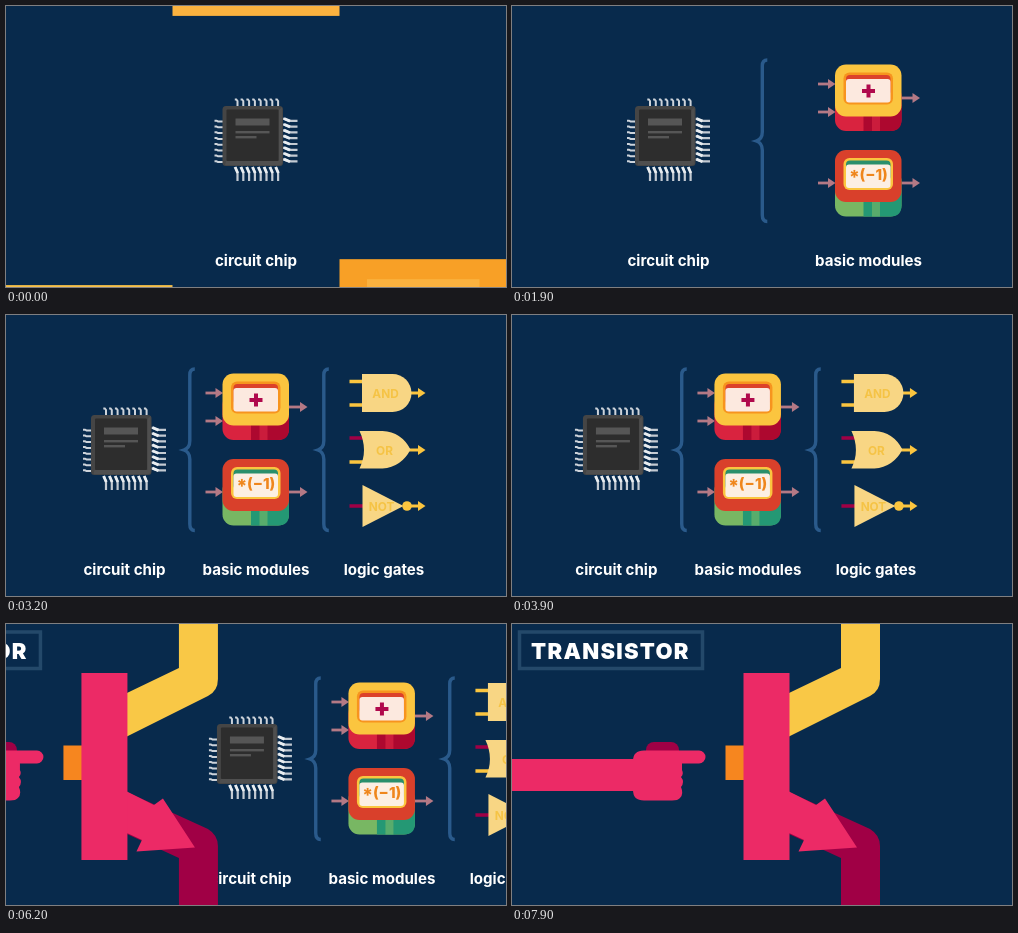
Write an HTML page that moves like this. It is 500 by 281 pixels and loops after 8000 ms.

```html
<!DOCTYPE html>
<html lang="en">
<head>
<meta charset="utf-8">
<title>From chip to transistor</title>
<style>
html, body { margin: 0; width: 100%; height: 100%; overflow: hidden; background: #082a4c; }
svg { display: block; width: 100vw; height: 100vh; }
text { font-family: Inter, "Open Sans", sans-serif; font-weight: 700; text-anchor: middle; }
.label { font-size: 15.1px; fill: #fff; }
.gate { font-size: 11.8px; fill: #f5c345; }
.value { font-size: 15px; font-weight: 800; fill: #ef861c; }
.title { font-size: 22px; font-weight: 900; letter-spacing: 1.3px; fill: #fff; text-anchor: start; }
</style>
</head>
<body>
<svg id="stage" viewBox="0 0 500 281"></svg>
<script>
const YELLOW = '#fbc53f', PALE = '#f8d684', PINK = '#ec2a66', PURPLE = '#a00045', ORANGE = '#f6861f';
const DURATION = 8000;

const rect = (x, y, w, h, fill, r = 0) =>
  `<rect x="${x}" y="${y}" width="${w}" height="${h}" rx="${r}" fill="${fill}"/>`;
const shape = (d, fill) => `<path d="${d}" fill="${fill}"/>`;
const line = (d, color, width) => `<path d="${d}" fill="none" stroke="${color}" stroke-width="${width}"/>`;
const text = (x, y, s, cls) => `<text x="${x}" y="${y}" class="${cls}">${s}</text>`;
const group = (id, body) => `<g id="${id}">${body}</g>`;
const label = (id, x, s) => group(id, text(x, 259.5, s, 'label'));
const arrow = (x, y, len, color, w = 2.8) =>
  line(`M${x} ${y}h${len - 6}`, color, w) + shape(`M${x + len - 7} ${y - 5}l7.5 5l-7.5 5z`, color);

const brace = (id, x) => group(id, line(
  `M${x + 5} 54Q${x} 54 ${x} 60V126Q${x} 133 ${x - 6} 135Q${x} 137 ${x} 144V209Q${x} 215.5 ${x + 5} 215.5`,
  '#2a5a8b', 3.4));

function chip() {
  let pins = '';
  for (let i = 0; i < 8; i++) {
    const x = 43.5 + 5.8 * i, y = 114.5 + 5.8 * i;
    pins += line(`M${x + 1} 101V95l-1.2 -1.5h-1.5`, '#cdd3da', 2)
      + line(`M30 ${y + 1}H25l-1.5 -.8h-2`, '#cdd3da', 2)
      + line(`M${x - 1} 161l2 6v8`, '#c3cad2', 2.2) + line(`M${x - 1.5} 161l2.8 6`, '#e9edf0', 2.8)
      + line(`M90 ${y - 2}l6 2.3h8.5`, '#c3cad2', 2.2) + line(`M91 ${y - 2}l6 2.6`, '#e9edf0', 2.8);
  }
  return pins + rect(29.5, 100, 60.5, 60, '#454545', 3.5)
    + shape('M33 155H86V104L89 101V157Q89 159 87 159H32z', '#4f4f4f')
    + rect(33.5, 103.5, 52, 51.5, '#2d2d2d', 1)
    + rect(42.5, 112.5, 34, 7, '#565656')
    + rect(42.5, 125, 34, 2.4, '#565656') + rect(42.5, 130, 21, 2.4, '#565656');
}

// One module: lid, striped base and a small screen.
function box(y, lid, base, dark, mid, ring, band, screen) {
  return rect(161, y + 20, 66.5, 46.5, base, 11)
    + shape(`M189.5 ${y + 40}H227.5V${y + 55.5}Q227.5 ${y + 66.5} 216.5 ${y + 66.5}H189.5z`, dark)
    + rect(198, y + 40, 8, 26.5, mid)
    + rect(161, y, 66.5, 52, lid, 11)
    + rect(169.5, y + 8, 49.5, 32, ring, 6)
    + rect(172, y + 10.5, 44.5, 20, band, 4)
    + rect(172, y + 14.5, 44.5, 23.5, screen, 3);
}

function modules() {
  const c = '#b47985';
  return arrow(144, 78, 17, c) + arrow(144, 106, 17, c) + arrow(227.5, 92, 18, c)
    + arrow(144, 177, 17, c) + arrow(227.5, 177, 18, c)
    + box(58.5, YELLOW, '#d9233f', '#ad082f', '#cb1c3c', '#f7941e', '#dc412a', '#fce9df')
    + line('M188 85h13M194.5 78.5v13', '#b0094c', 4)
    + box(144, '#d9402b', '#78b763', '#249874', '#58ac6c', YELLOW, '#2a8f6b', '#fcefe3')
    + text(194.5, 174, '*(−1)', 'value');
}

function gates() {
  return line('M288 66.5h14M288 90h14M288 147h16', YELLOW, 3.6)
    + line('M288 123h16M288 191h14', PURPLE, 3.6)
    + [78, 135, 191].map(y => arrow(347, y, 16.5, YELLOW, 3)).join('')
    + shape('M300.5 59H331A19 19 0 0 1 331 97H300.5z', PALE)
    + shape('M298 116H321Q340 117 349 134.5Q340 152 321 153.5H298Q307 135 298 116z', PALE)
    + shape('M301 170L342 191L301 212z', PALE)
    + `<circle cx="345.5" cy="191" r="4.8" fill="${YELLOW}"/>`
    + text(324, 83, 'AND', 'gate') + text(323, 139.5, 'OR', 'gate') + text(320, 195.5, 'NOT', 'gate');
}

function transistor() {
  return shape('M466 69H475V110L447 124V114L466 104z', PURPLE)
    + shape('M447 146L475 160V201H466V166L447 156z', PURPLE)
    + shape('M447 146L455 150L458 145L470 164L447 163L451 158L447 156z', PINK)
    + rect(402.5, 131.5, 10, 6.5, YELLOW, 1) + rect(410, 126.5, 18, 17, YELLOW, 3)
    + rect(414, 124.5, 10, 4, '#e8aa32', 2)
    + rect(428, 124.5, 7, 17, '#f5b63a') + rect(435, 104, 12, 62, YELLOW);
}

function closeUp() {
  return shape('M329 -5H368V55Q368 67 358 72L277 112.5V69L329 44z', '#f9c846')
    + shape('M277 168L358 205Q368 211 368 222V286H329V234L277 210z', PURPLE)
    + shape('M277 167.5L304 181L313 174.5L345 223.5L286.5 227.5L292 216L277 209z', PINK)
    + rect(213.5, 121.5, 19, 34.5, ORANGE) + rect(231.5, 49, 46, 187, PINK)
    + rect(134, 118, 33, 20, PURPLE, 8)
    + rect(-500, 135, 640, 32, PINK)
    + shape('M132 126.5H187A6.5 6.5 0 0 1 187 139.5H170V146Q172 150 169 153Q173 158 169 163'
      + 'Q172 170 168 174Q166 176.5 160 176.5H132Q121 176.5 121 166V137Q121 126.5 132 126.5z', PINK)
    + line('M7.5 8h183v36.5h-183z', '#24496a', 3.5)
    + text(19, 34.5, 'TRANSISTOR', 'title');
}

stage.innerHTML =
  group('chipG', chip() + label('chipL', 63, 'circuit chip'))
  + brace('brace1', 128.3)
  + group('modsG', modules() + label('modsL', 194.5, 'basic modules')) + brace('brace2', 262.3)
  + group('gatesG', gates() + label('gatesL', 322.5, 'logic gates'))
  + brace('brace3', 389.8) + group('tranG', transistor()) + label('tranL', 441, 'transistors')
  + group('closeG', closeUp())
  + group('colA', rect(0, 0, 166.5, 281, '#f6c04a'))
  + group('colB', rect(166.5, -281, 167, 281, '#fbb23f'))
  + group('colC', rect(333.5, 0, 167, 281, '#f8a026') + rect(361, 20, 112.5, 240, '#fbb23f'));

const ramp = (t, start, len) => Math.min(1, Math.max(0, (t - start) / len));
const ease = (t, start, len) => {
  const p = ramp(t, start, len);
  return p < .5 ? 4 * p ** 3 : 1 - (2 - 2 * p) ** 3 / 2;
};
const move = (id, x, y = 0, alpha = 1) => {
  const node = document.getElementById(id);
  node.setAttribute('transform', `translate(${x.toFixed(2)} ${y.toFixed(2)})`);
  node.setAttribute('opacity', alpha);
};
const rise = (t, start) => 40 * (1 - ramp(t, start, 400)) ** 3;

function draw(t) {
  const shift = 55.5 * (1 - ease(t, 3602, 750));
  const push = 500 * ease(t, 5527, 1500);
  const base = shift + push;
  const modX = base + 300 * (1 - ease(t, 570, 450)) + 106.5 * (1 - ease(t, 2313, 800));
  const chipX = base + 93.5 * (1 - ease(t, 480, 520)) + 38 * (1 - ease(t, 2330, 800));
  const gateX = base + 200 * (1 - ease(t, 2300, 800));

  move('chipG', chipX);
  move('brace1', base + 66.5 * (1 - ease(t, 2334, 800)), 0, ramp(t, 700, 250));
  move('modsG', modX);
  move('modsL', 0, rise(t, 1010));
  move('brace2', modX, 0, ramp(t, 2350, 250));
  move('gatesG', gateX);
  move('gatesL', 0, rise(t, 2650));
  move('brace3', base, 0, ramp(t, 3950, 200));
  move('tranG', base, 0, ramp(t, 4050, 200));
  move('tranL', base, rise(t, 4120));
  move('closeG', -500 * (1 - ease(t, 5342, 1500)));

  move('colA', 0, 279 + t * .1);
  move('colB', 0, 10 - t * .1);
  move('colC', 0, 253 + t * .17);
}

function tick(now) {
  draw(now % DURATION);
  requestAnimationFrame(tick);
}
draw(0);
requestAnimationFrame(tick);
</script>
</body>
</html>
```
